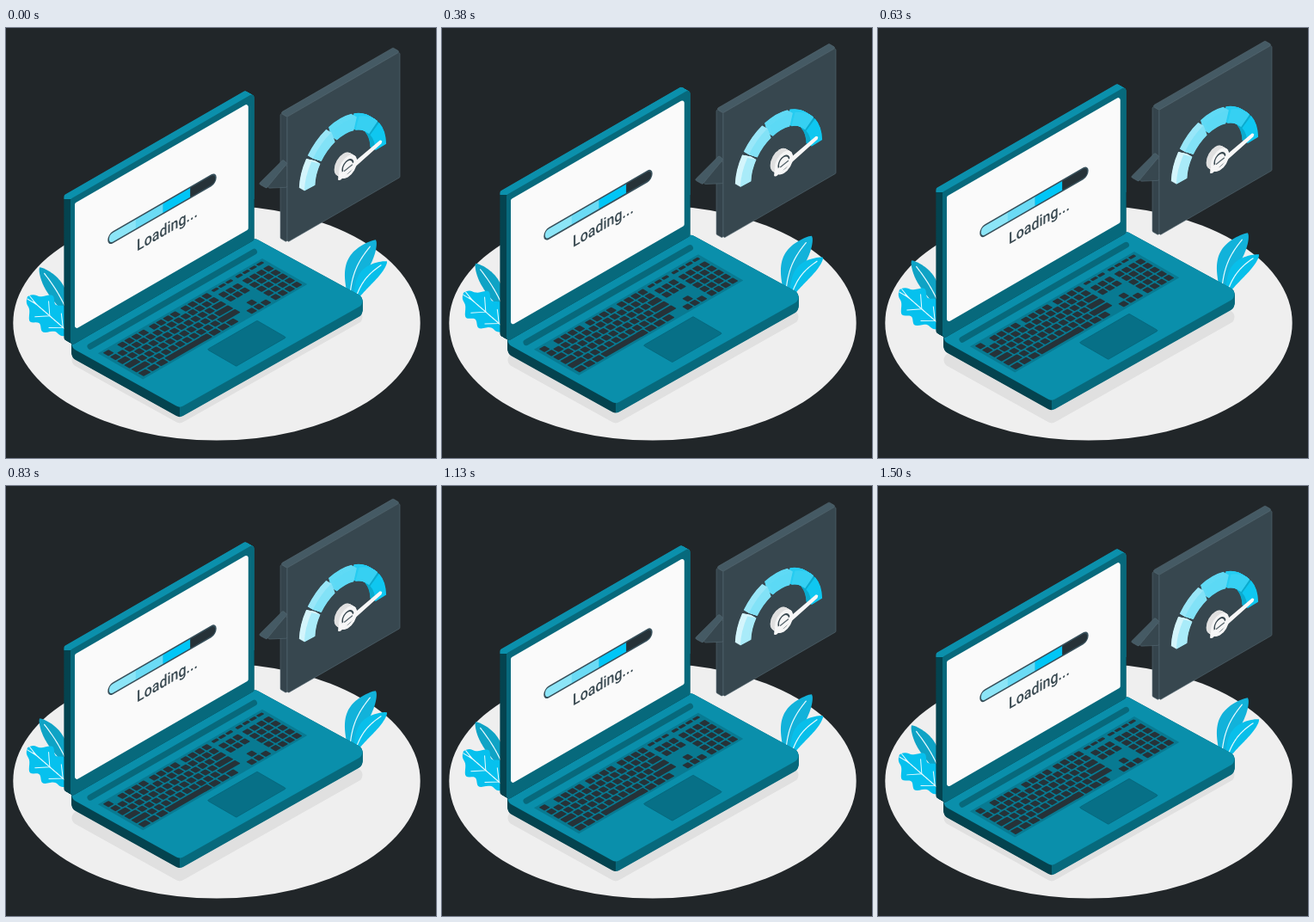
Recreate the animation shown at these times as an HTML page with a canvas. Size 500 by 500 pixels, loop 1540 ms.

```html
<!DOCTYPE html>
<html lang="en">
<head>
<meta charset="utf-8">
<title>Loading laptop</title>
<style>
html, body { margin: 0; width: 100%; height: 100%; overflow: hidden; background: #212629; }
canvas { display: block; width: 100vw; height: 100vh; }
</style>
</head>
<body>
<canvas id="stage" width="500" height="500"></canvas>
<script>
const ctx = document.getElementById('stage').getContext('2d');
const LOOP = 1540;
const RISE = 4.2;
const TAU = Math.PI * 2;

// Isometric unit directions.
const RIGHT = [0.866, -0.5];
const FRONT = [0.866, 0.5];
const DOWN = [0, 1];

const move = ([x, y], [dx, dy], k) => [x + dx * k, y + dy * k];
const shift = (points, dir, k) => points.map(p => move(p, dir, k));

function quad(corner, dirA, a, dirB, b) {
  const far = move(corner, dirA, a);
  return [corner, far, move(far, dirB, b), move(corner, dirB, b)];
}

function paint(fill, stroke, width = 1) {
  if (fill) { ctx.fillStyle = fill; ctx.fill(); }
  if (stroke) { ctx.strokeStyle = stroke; ctx.lineWidth = width; ctx.stroke(); }
}

function poly(points, fill, radius = 0, stroke, width) {
  const [first, last] = [points[0], points.at(-1)];
  ctx.beginPath();
  ctx.moveTo((first[0] + last[0]) / 2, (first[1] + last[1]) / 2);
  points.forEach((p, i) => ctx.arcTo(...p, ...points[(i + 1) % points.length], radius));
  ctx.closePath();
  paint(fill, stroke, width);
}

function line(points, color, width) {
  ctx.beginPath();
  points.forEach(p => ctx.lineTo(...p));
  ctx.lineCap = 'round';
  paint(null, color, width);
}

function circle(r, fill, stroke, width) {
  ctx.beginPath();
  ctx.arc(0, 0, r, 0, TAU);
  paint(fill, stroke, width);
}

// Sweep a shape by `depth` along a direction, ending at its own place.
function extrude(points, dir, depth, fill, radius) {
  for (let k = 20; k >= 0; k--) poly(shift(points, dir, depth * k / 20), fill, radius);
}

// A hard colour change halfway to (x, y).
function split(x, y, first, second) {
  const g = ctx.createLinearGradient(0, 0, x, y);
  g.addColorStop(0.5, first);
  g.addColorStop(0.5, second);
  return g;
}

function onPlane([x, y], dirA, dirB, draw) {
  ctx.save();
  ctx.transform(...dirA, ...dirB, x, y);
  draw();
  ctx.restore();
}
const onWall = (origin, draw) => onPlane(origin, RIGHT, DOWN, draw);

const deck = [[68, 367], [289, 244], [423, 317], [202, 441.5]];

function drawGround() {
  ctx.fillStyle = '#212629';
  ctx.fillRect(0, 0, 500, 500);
  ctx.beginPath();
  ctx.ellipse(245, 343, 236.7, 136.6, 0, 0, TAU);
  paint('#efefef');
  poly(shift(deck, DOWN, 19), '#e0e0e0', 8);
}

// A leaf from base to tip, bowed sideways, optionally with wavy lobes.
function drawLeaf([x, y], [tipX, tipY], half, bow, fill, lobes = 0) {
  const length = Math.hypot(tipX - x, tipY - y);
  const spine = (t, side = 0) => {
    const swell = Math.sin(Math.PI * t ** 1.3) ** 0.75;
    const wave = lobes ? 1 - 0.2 * Math.cos(TAU * lobes * t) : 1;
    return [bow * Math.sin(Math.PI * t) + side * half * swell * wave, -length * t];
  };
  const steps = Array.from({ length: 41 }, (_, i) => i / 40);
  const vein = '#e8fbff';
  ctx.save();
  ctx.translate(x, y);
  ctx.rotate(Math.atan2(tipX - x, y - tipY));
  poly([...steps.map(t => spine(t, -1)), ...steps.map(t => spine(1 - t, 1))], fill);
  line(steps.slice(0, 36).map(t => spine(t)), vein, 1.2);
  for (let i = 1; i < lobes; i++) {
    const t = i / lobes;
    line([spine(t + 0.12, -0.6), spine(t - 0.05), spine(t + 0.12, 0.6)], vein, 1);
  }
  ctx.restore();
}

function drawPlants() {
  drawLeaf([76, 340], [39, 278], 10, 3, '#0fa3c5');
  drawLeaf([79, 359], [25, 312], 18, 0, '#06c1ee', 3.5);
  drawLeaf([399, 319], [430, 246], 13, -8, '#12b2da');
  drawLeaf([404, 321], [443, 271], 9.5, -7, '#08bfea');
}

function drawScreen() {
  const lid = quad([75, 198.5], RIGHT, 246.5, DOWN, 171);
  extrude(lid, FRONT, -8.7, split(0, 397, '#0b90ac', '#04434f'), 3);
  poly(lid, '#07697c', 3);
  poly(quad([80, 203.5], RIGHT, 233, DOWN, 147), '#fafafa', 2.5);

  onWall([181.5, 210], () => {
    const pill = (w, h) => {
      ctx.beginPath();
      ctx.roundRect(-w / 2, -h / 2, w, h, h / 2);
    };
    pill(146, 14);
    paint('#37505b');
    pill(142.4, 10.4);
    ctx.clip();
    ['#8ce5f7', '#6bdbf5', '#00c6f7', '#263238'].forEach((color, i) => {
      ctx.fillStyle = color;
      ctx.fillRect(-72 + i * 36.6, -6, 37, 12);
    });
  });
  onWall([152, 259.5], () => {
    ctx.font = '500 18.5px Roboto, sans-serif';
    ctx.fillStyle = '#37474f';
    ctx.fillText('Loading...', 0, 0);
  });
}

function drawKeyboard() {
  const size = 9.43;
  const key = (col, row, w = 1, h = 1) => {
    ctx.beginPath();
    ctx.roundRect((col + 0.1) * size, (row + 0.1) * size, (w - 0.2) * size, (h - 0.2) * size, 1);
    paint('#263238');
  };
  onPlane([111, 377.5], RIGHT, FRONT, () => {
    ctx.fillStyle = '#087a92';
    ctx.fillRect(-0.3 * size, -0.2 * size, 23.4 * size, 6.4 * size);

    // Main block: function keys in fours, staggered letters, space bar row.
    key(0, 0);
    for (let i = 0; i < 12; i++) key(2 + i + Math.floor(i / 4) / 2, 0);
    for (let row = 1; row < 5; row++) {
      const lead = 0.6 + 0.4 * row;
      const count = 14 - row;
      key(0, row, lead);
      for (let i = 0; i < count; i++) key(lead + i, row);
      key(lead + count, row, 15 - lead - count);
    }
    for (let i = 0; i < 7; i++) key(i < 3 ? i * 1.25 : 5 + i * 1.25, 5, 1.25);
    key(3.75, 5, 6.25);

    // Navigation keys with arrows, then the number pad.
    for (let row = 0; row < 6; row++) {
      const height = row ? 1 : 0.6;
      for (let i = 0; i < 3; i++)
        if (row !== 3 && (row !== 4 || i === 1)) key(15.4 + i, row, 1, height);
      for (let i = 0; i < 4; i++) key(18.8 + i, row, 1, height);
    }
  });
}

function drawBase() {
  extrude(deck, DOWN, 11.5, split(404, 0, '#04434f', '#07697c'), 8);
  poly(deck, '#0a8fab', 8);
  const hinge = [98, 370];
  line([hinge, move(hinge, RIGHT, 220)], '#07697c', 7);
  drawKeyboard();
  poly(quad([234, 373.5], RIGHT, 67, FRONT, 39), '#077087', 1, '#06657a', 0.8);
}

function drawPanel() {
  const corner = [327, 103], width = 151.3, height = 146, depth = -9.2;
  const face = (points, fill) => poly(points, fill, 1.5, '#566b75', 0.6);
  face(quad(corner, FRONT, depth, DOWN, height), '#35444c');
  face([[294, 181], [322, 153], [327, 157], [303, 186]], '#455a64');
  face([[303, 186], [327, 157], [327, 185]], '#37474f');
  face(quad(corner, FRONT, depth, RIGHT, width), '#455a64');
  face(quad(corner, RIGHT, width, DOWN, height), '#37474f');
}

function drawGauge() {
  const step = Math.PI / 5, gap = 0.03, depth = 7;
  for (let i = 4; i >= 0; i--) {
    const light = 82 - 8 * i;
    const from = Math.PI + i * step + gap, to = from + step - 2 * gap;
    for (let k = depth; k >= 0; k -= 0.5) {
      onWall(move([394.5, 163.5], FRONT, -k), () => {
        ctx.beginPath();
        ctx.arc(0, 0, 55, from, to);
        ctx.arc(0, 0, 40.5, to, from, true);
        paint(`hsl(191 88% ${k ? light + 9 - 4 * i : light}%)`);
      });
    }
  }

  const hub = [397.5, 161];
  for (let k = 6; k > 0; k -= 0.5) onWall(move(hub, FRONT, -k), () => circle(12.3, '#e0e0e0'));
  onWall(hub, () => {
    circle(12.3, '#f5f5f5');
    circle(7.3, '#f5f5f5', '#37474f', 1.8);
  });
  poly([[386.5, 171], [435, 130], [437.5, 131], [436.5, 134], [389, 176.5], [386, 177]], '#f7f7f7', 1);
  line([[393.5, 166], [402.5, 158.8]], '#59676e', 1.3);
}

function frame(time) {
  const lift = RISE * (1 - Math.cos(TAU * (time + 30) / LOOP));
  drawGround();
  ctx.save();
  ctx.translate(0, 0.3 - lift);
  drawPlants();
  drawBase();
  drawScreen();
  drawPanel();
  drawGauge();
  ctx.restore();
}

const start = performance.now();
function tick() {
  frame(performance.now() - start);
  requestAnimationFrame(tick);
}
tick();
</script>
</body>
</html>
```
